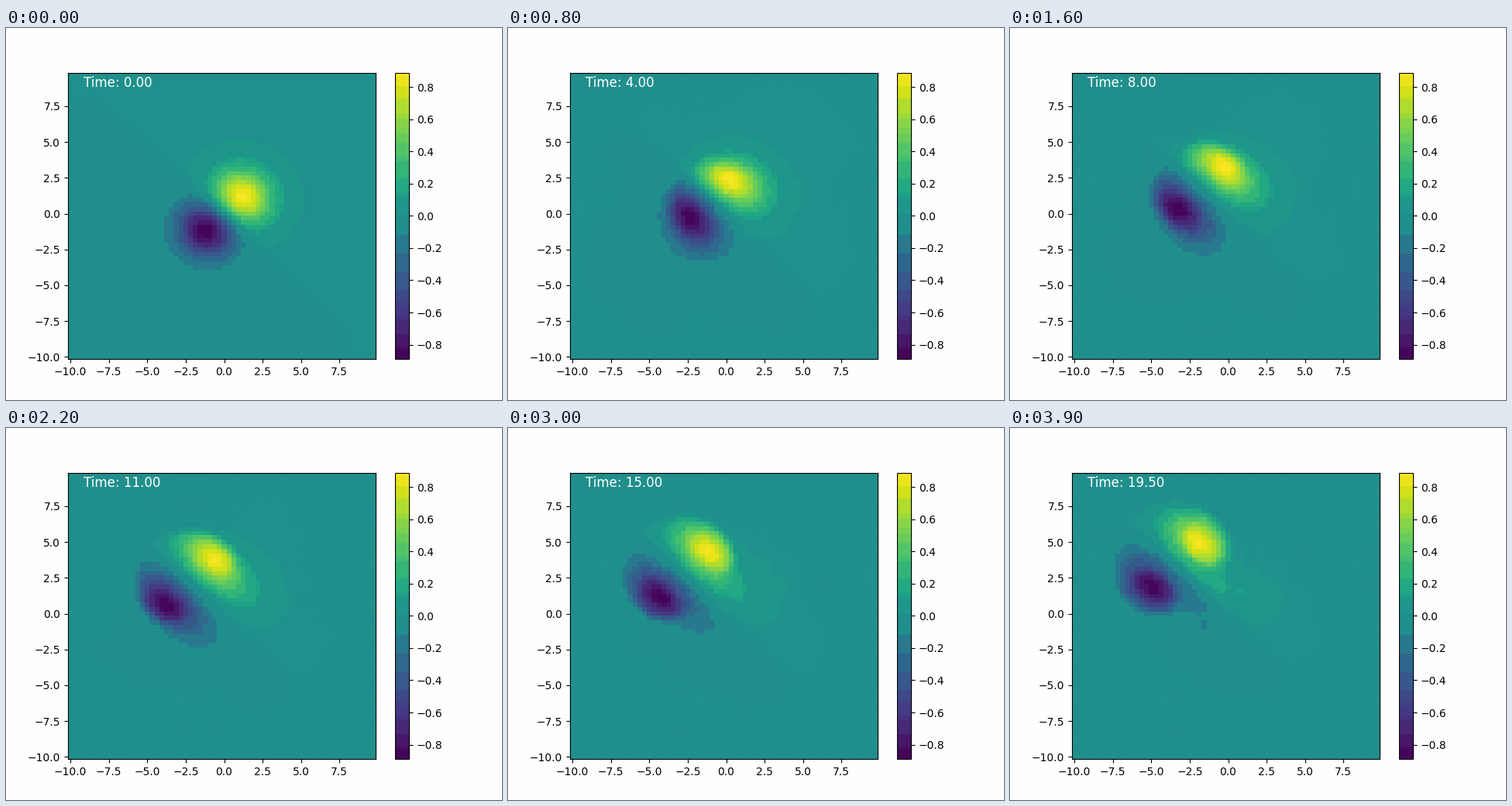
These frames come from a looping animation (640x480 px, 4 s). A matplotlib script:

```python
import numpy as np
import matplotlib.pyplot as plt
from matplotlib.animation import FuncAnimation
from matplotlib.colors import ListedColormap

N, L = 64, 20.0
FRAMES, FRAME_TIME = 40, 0.5
SUBSTEPS = 8
DT = FRAME_TIME / SUBSTEPS
NU = 4e-4

# Periodic grid and spectral operators
x = np.linspace(-L / 2, L / 2, N, endpoint=False)
X, Y = np.meshgrid(x, x)
k = 2 * np.pi * np.fft.fftfreq(N, L / N)
KX, KY = np.meshgrid(k, k)
K2 = KX**2 + KY**2
INV_K2 = np.where(K2 > 0, 1 / np.where(K2 > 0, K2, 1), 0)
k_cut = np.abs(k).max() * 2 / 3
KEEP = ((np.abs(KX) < k_cut) & (np.abs(KY) < k_cut)).astype(float)


def real(f_hat):
    return np.fft.ifft2(f_hat).real


def tendency(q_hat):
    """Advection of q by the flow of its own stream function."""
    psi_hat = q_hat * INV_K2
    u, v = real(-1j * KY * psi_hat), real(1j * KX * psi_hat)
    advection = u * real(1j * KX * q_hat) + v * real(1j * KY * q_hat)
    return -KEEP * np.fft.fft2(advection) - NU * K2 * q_hat


def rk4(q_hat):
    a = tendency(q_hat)
    b = tendency(q_hat + DT / 2 * a)
    c = tendency(q_hat + DT / 2 * b)
    d = tendency(q_hat + DT * c)
    return q_hat + DT / 6 * (a + 2 * b + 2 * c + d)


def gaussian(cx, cy):
    return np.exp(-((X - cx)**2 + (Y - cy)**2) / 4)


def simulate():
    q = gaussian(1, 1) - gaussian(-1, -1)
    q_hat = np.fft.fft2(q)
    fields = [q]
    for _ in range(FRAMES - 1):
        for _ in range(SUBSTEPS):
            q_hat = rk4(q_hat)
        fields.append(real(q_hat))
    return fields


def banded_viridis(q, vmax):
    """Viridis merged into coarse RGB bands, each with its mean colour."""
    rgb = plt.get_cmap("viridis")(np.arange(256), bytes=True)[:, :3].astype(int)
    key = (rgb[:, 0] >> 5) * 128 + (rgb[:, 1] >> 4) * 8 + (rgb[:, 2] >> 5)
    band = np.unique(key, return_inverse=True)[1].ravel()
    level = np.clip(((q + vmax) / (2 * vmax) * 256).astype(int), 0, 255)
    weight = 26 + 36 * np.bincount(level.ravel(), minlength=256)
    total = np.bincount(band, weight)
    mean = [np.bincount(band, weight * rgb[:, c]) / total for c in range(3)]
    return ListedColormap(np.floor(np.array(mean).T)[band] / 255)


fields = simulate()
vmax = np.abs(fields[0]).max()

fig, ax = plt.subplots(figsize=(6.4, 4.8), dpi=100, facecolor="#fefefe")
mesh = ax.pcolormesh(x, x, fields[0], cmap=banded_viridis(fields[0], vmax),
                     vmin=-vmax, vmax=vmax, shading="nearest")
fig.colorbar(mesh, ax=ax)
label = ax.text(0.05, 0.95, "", transform=ax.transAxes, color="white",
                fontsize=12)


def update(i):
    mesh.set_array(fields[i])
    label.set_text(f"Time: {i * FRAME_TIME:.2f}")
    return mesh, label


anim = FuncAnimation(fig, update, frames=FRAMES, interval=100, repeat=True)
plt.show()
```
